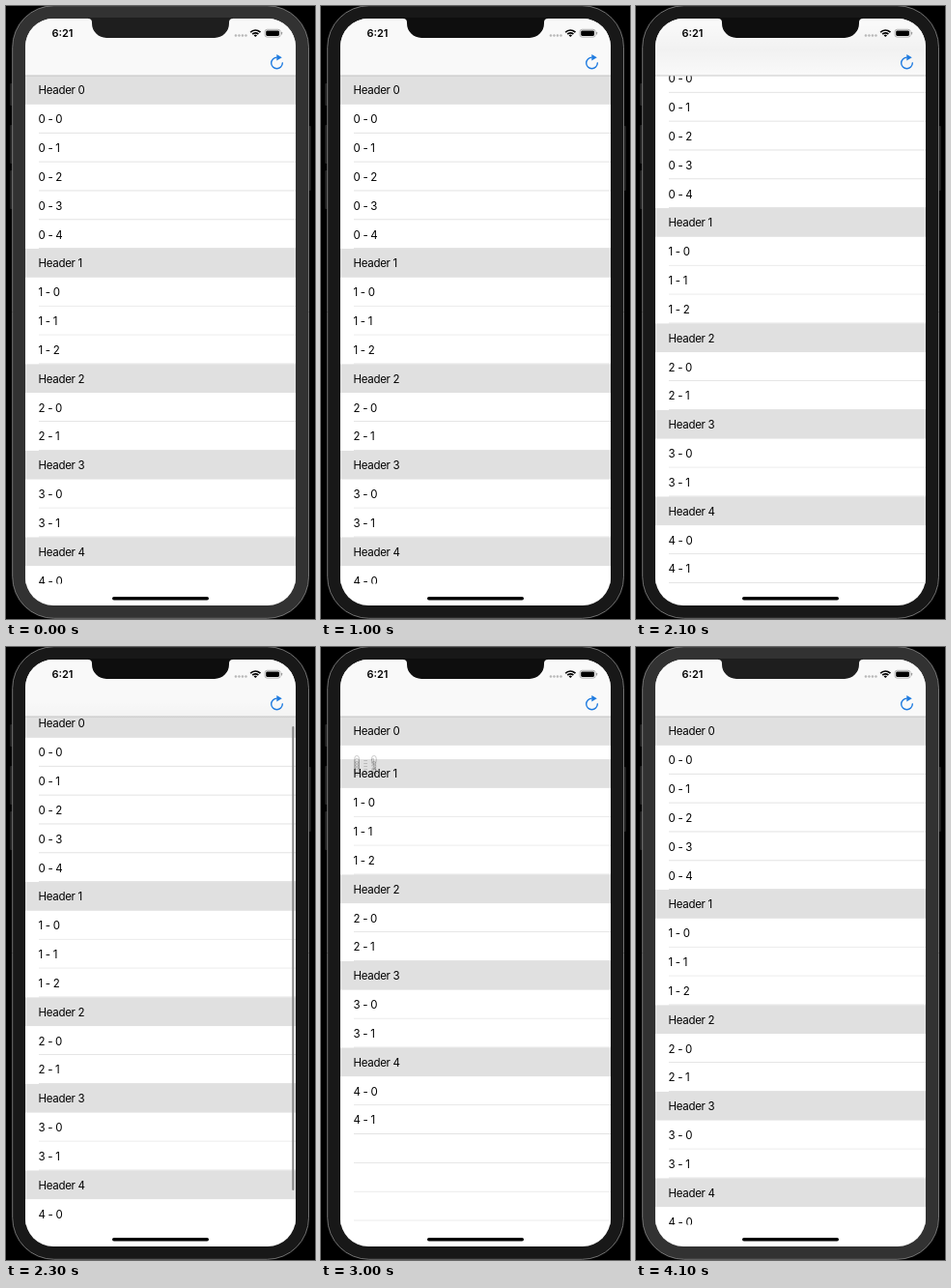
Animation of 320x634 px, one loop 4400 ms. Source, as an HTML page with a canvas:

```html
<!DOCTYPE html>
<html lang="en">
<head>
<meta charset="utf-8">
<title>Collapsible list</title>
<style>
html, body { margin: 0; width: 320px; height: 634px; overflow: hidden; background: #000; }
canvas { display: block; }
</style>
</head>
<body>
<canvas id="stage" width="320" height="634"></canvas>
<script>
const ctx = document.getElementById('stage').getContext('2d');
const LOOP = 4400, STEP = 100;
const PITCH = 29.84, LIST_TOP = 72, LIST_BOTTOM = 597.5, LEFT = 20, WIDTH = 280;
const SECTIONS = [5, 3, 2, 2, 2];
const FONT = 'Inter, "Liberation Sans", sans-serif';

// [time, value] keys
const SCROLL = [[1200, 0], [1300, 6], [1400, 24], [1500, 44], [1600, 51], [1700, 46], [1800, 43],
  [1900, 42], [2100, 42], [2200, 34], [2300, 8], [2400, -22], [2500, -12], [2600, -4.3], [2700, -1], [2800, 0]];
const BAR = [[1200, 0], [1300, 1], [1800, 1], [2000, 0], [2100, 0], [2200, 1], [2700, 1], [2900, 0]];
const TONE = [[0, 50], [300, 24], [3700, 24], [4100, 50]];

function track(keys, t) {
  if (t <= keys[0][0]) return keys[0][1];
  for (let i = 1; i < keys.length; i++) {
    const [t0, a] = keys[i - 1], [t1, b] = keys[i];
    if (t <= t1) return a + (b - a) * (t - t0) / (t1 - t0);
  }
  return keys[keys.length - 1][1];
}

function ease(t, start) {
  const u = Math.min(1, Math.max(0, (t - start) / 300));
  return (1 - Math.cos(Math.PI * u)) / 2;
}

// 1 = first section fully open, 0 = closed
const openness = t => 1 - ease(t, 160) + ease(t, 640) - ease(t, 2760) + ease(t, 3260);

const gray = v => `rgb(${v},${v},${v})`;

function rect(x, y, w, h, color) {
  ctx.fillStyle = color;
  ctx.fillRect(x, y, w, h);
}

function rounded(x, y, w, h, r, color) {
  ctx.beginPath();
  ctx.roundRect(x, y, w, h, r);
  ctx.fillStyle = color;
  ctx.fill();
}

function clipped(draw) {
  ctx.save();
  ctx.clip();
  draw();
  ctx.restore();
}

function label(text, top) {
  ctx.font = `11.5px ${FONT}`;
  ctx.letterSpacing = '-0.3px';
  ctx.fillStyle = '#000';
  ctx.fillText(text, 33.5, top + 19.3);
}

function separator(top) {
  rect(34, top + PITCH - 0.8, 266, 0.8, '#dcdcdc');
}

function drawHeader(i, top) {
  rect(LEFT, top, WIDTH, PITCH, '#e0e0e0');
  label('Header ' + i, top);
}

function drawList(t) {
  const open = openness(t), scroll = track(SCROLL, t);
  const fade = Math.pow(Math.max(0, open), 0.7);
  const start = LIST_TOP - scroll;
  const foldTop = start + PITCH;
  let y = foldTop + SECTIONS[0] * PITCH * open;

  const eachFolded = draw => {
    ctx.globalAlpha = fade;
    for (let r = 0; r < SECTIONS[0]; r++) draw(foldTop + r * PITCH * open, r);
    ctx.globalAlpha = 1;
  };

  eachFolded(separator);
  drawHeader(0, start);
  for (let s = 1; s < SECTIONS.length; s++) {
    drawHeader(s, y);
    y += PITCH;
    for (let r = 0; r < SECTIONS[s]; r++, y += PITCH) {
      rect(LEFT, y, WIDTH, PITCH, '#fff');
      separator(y);
      label(`${s} - ${r}`, y);
    }
  }
  for (; y < LIST_BOTTOM; y += PITCH) {
    rect(LEFT, y, WIDTH, PITCH, '#fff');
    separator(y);
  }
  if (fade > 0) eachFolded((top, r) => label(`0 - ${r}`, top));

  ctx.globalAlpha = track(BAR, t);
  const barTop = 74.5 + Math.max(0, scroll) * 0.926;
  rounded(296.3, barTop, 2, Math.min(480, 595 - barTop), 1, '#858585');
  ctx.globalAlpha = 1;
}

function drawRefresh() {
  ctx.strokeStyle = ctx.fillStyle = '#1f7be0';
  ctx.lineWidth = 1.4;
  ctx.beginPath();
  ctx.arc(280.5, 59, 5.8, -Math.PI / 2, -0.1, true);
  ctx.stroke();
  ctx.beginPath();
  ctx.moveTo(280.3, 50);
  ctx.lineTo(285.8, 53.3);
  ctx.lineTo(280.3, 56.6);
  ctx.fill();
}

function drawStatus() {
  ctx.font = `600 11px ${FONT}`;
  ctx.letterSpacing = '0px';
  ctx.fillStyle = '#000';
  ctx.textAlign = 'center';
  ctx.fillText('6:21', 58.5, 32);
  ctx.textAlign = 'left';
  for (let i = 0; i < 4; i++) rounded(236.7 + i * 3.5, 29.2, 2.5, 2.5, 1.25, '#b8b8b8');

  ctx.strokeStyle = '#000';
  ctx.lineWidth = 1.7;
  for (const r of [7, 4.2]) {
    ctx.beginPath();
    ctx.arc(258.3, 32, r, -Math.PI * 0.76, -Math.PI * 0.24);
    ctx.stroke();
  }
  ctx.beginPath();
  ctx.moveTo(258.3, 32);
  ctx.arc(258.3, 32, 2.3, -Math.PI * 0.76, -Math.PI * 0.24);
  ctx.fillStyle = '#000';
  ctx.fill();

  ctx.beginPath();
  ctx.roundRect(268, 24.3, 16.2, 7.8, 2.3);
  ctx.strokeStyle = '#a0a0a0';
  ctx.lineWidth = 0.8;
  ctx.stroke();
  rounded(269.2, 25.5, 13.8, 5.4, 1.3, '#000');
  rounded(285, 26.8, 1.1, 2.8, 0.5, '#a0a0a0');
}

function drawNav(t) {
  rect(LEFT, 13, WIDTH, 59, '#f9f9f9');
  const scroll = track(SCROLL, t);
  if (scroll > 0) {
    // soft trace of content beneath the bar
    const mid = LIST_TOP + PITCH / 2 - scroll;
    const haze = ctx.createLinearGradient(0, mid - 26, 0, mid + 26);
    haze.addColorStop(0, 'rgba(0,0,0,0)');
    haze.addColorStop(0.5, 'rgba(0,0,0,0.03)');
    haze.addColorStop(1, 'rgba(0,0,0,0)');
    rect(LEFT, 13, WIDTH, 59, haze);
  }
  rect(LEFT, 71.6, WIDTH, 0.8, '#b8b8b8');
  drawRefresh();
  drawStatus();
}

function drawNotch(color) {
  ctx.beginPath();
  ctx.moveTo(85, 12);
  ctx.lineTo(85, 13);
  ctx.quadraticCurveTo(89, 13, 89, 17);
  ctx.arcTo(89, 33, 105, 33, 15);
  ctx.arcTo(231, 33, 231, 17, 15);
  ctx.lineTo(231, 17);
  ctx.quadraticCurveTo(231, 13, 235, 13);
  ctx.lineTo(235, 12);
  ctx.fillStyle = color;
  ctx.fill();
}

function drawPhone(t) {
  const tone = Math.round(track(TONE, t));
  rect(0, 0, 320, 634, '#000');
  for (const [x, y, h] of [[4, 80, 23], [4, 123, 40], [4, 170, 40], [313, 124, 67]]) {
    rounded(x, y, 3, h, 1, '#202020');
  }
  ctx.beginPath();
  ctx.roundRect(6.7, -0.3, 306.8, 633.6, 43);
  ctx.fillStyle = gray(tone);
  ctx.fill();
  ctx.strokeStyle = '#8c8c8c';
  ctx.lineWidth = 0.8;
  ctx.stroke();

  ctx.beginPath();
  ctx.roundRect(LEFT, 13, WIDTH, 607, 29);
  clipped(() => {
    rect(LEFT, 13, WIDTH, 607, '#fff');
    ctx.beginPath();
    ctx.rect(LEFT, LIST_TOP, WIDTH, LIST_BOTTOM - LIST_TOP);
    clipped(() => drawList(t));
    drawNav(t);
    rounded(110, 611, 100, 3.6, 1.8, '#000');
  });
  drawNotch(gray(Math.round(tone * 0.6)));
}

function frame(now) {
  const t = Math.min(4100, Math.floor(now % LOOP / STEP) * STEP);
  drawPhone(t);
  requestAnimationFrame(frame);
}

const begin = performance.now();
drawPhone(0);
requestAnimationFrame(function tick() {
  frame(Math.max(0, performance.now() - begin));
  frame = now => {
    drawPhone(Math.min(4100, Math.floor(Math.max(0, now - begin) % LOOP / STEP) * STEP));
    requestAnimationFrame(frame);
  };
});
</script>
</body>
</html>
```
